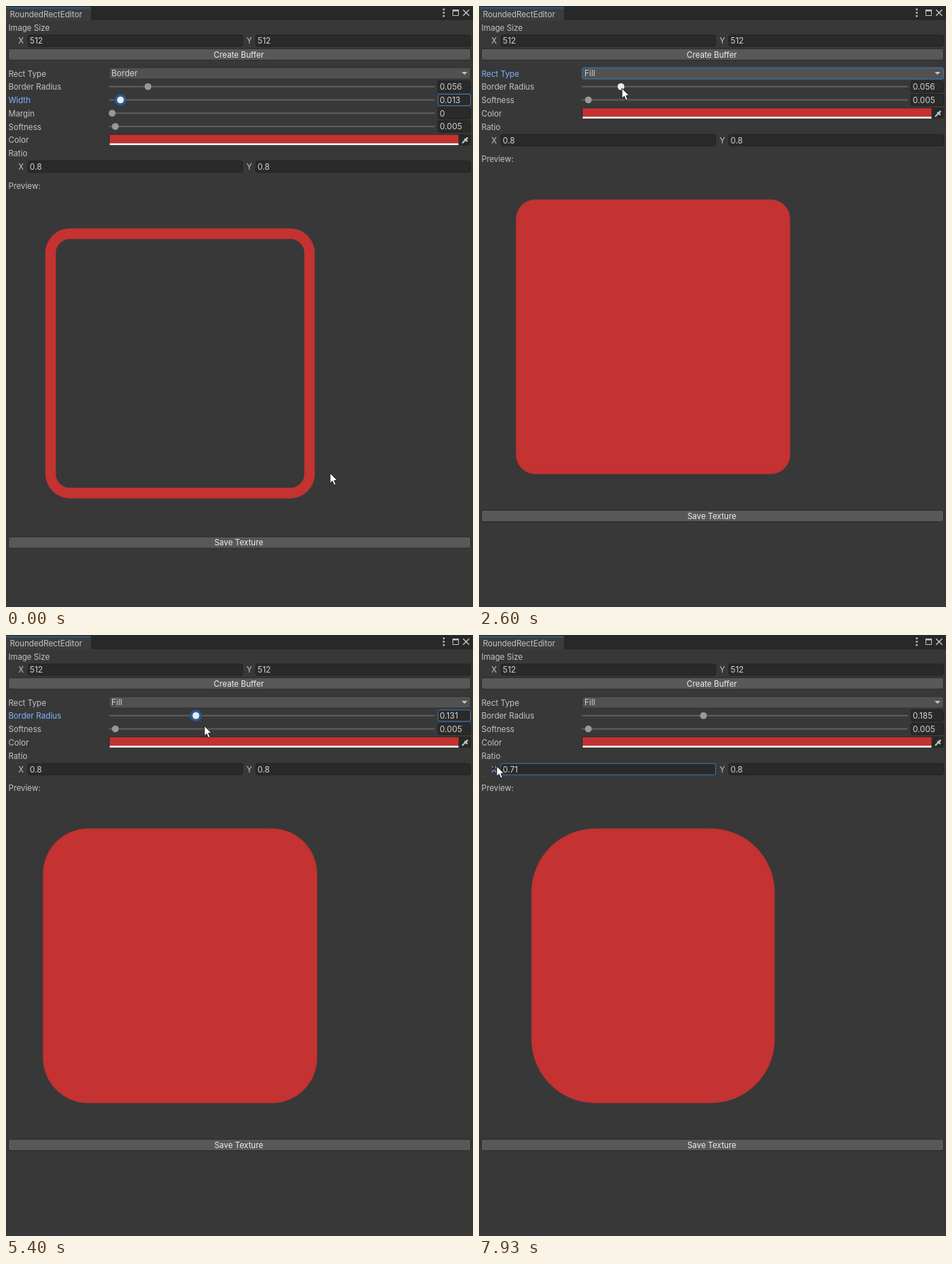
These frames come from a looping animation (660x848 px, 8000 ms). An HTML page:

```html
<!DOCTYPE html>
<html lang="en">
<head>
<meta charset="utf-8">
<title>RoundedRectEditor</title>
<style>
html, body { margin: 0; width: 100%; height: 100%; overflow: hidden; background: #383838; }
svg { display: block; width: 100vw; height: 100vh; }
text { font: 11.25px Inter, sans-serif; fill: #c4c4c4; white-space: pre; }
.num { font-size: 11.6px; fill: #d2d2d2; }
.btn { fill: #eee; text-anchor: middle; }
.on { fill: #81b4ff; }
.menu { font: 11px "Open Sans", sans-serif; letter-spacing: -.3px; fill: #111; }
</style>
</head>
<body>
<svg id="stage" viewBox="0 0 660 848"></svg>
<script>
const LOOP = 8000, ROW = 18.75, RED = '#c43232';
const OPEN = 1390, PICK = 2050, GRAB = 2720, DROP = 5790, SCRUB = 7060;
const stage = document.getElementById('stage');

// Keys are [time, value]; smooth, without overshoot.
function track(keys, t) {
  const last = keys.length - 1;
  if (t <= keys[0][0]) return keys[0][1];
  if (t >= keys[last][0]) return keys[last][1];
  const slope = i => i < 0 || i >= last ? 0 : (keys[i + 1][1] - keys[i][1]) / (keys[i + 1][0] - keys[i][0]);
  const tangent = i => {
    const a = slope(i - 1), b = slope(i);
    return a * b > 0 ? 2 * a * b / (a + b) : 0;
  };
  let i = 0;
  while (t >= keys[i + 1][0]) i++;
  const [t0, a] = keys[i], [t1, b] = keys[i + 1];
  const d = t1 - t0, u = (t - t0) / d, s = u * u * (3 - 2 * u);
  return a + (b - a) * s + d * u * (1 - u) * ((1 - u) * tangent(i) - u * tangent(i + 1));
}

const radiusKeys = [[2800, .056], [3330, .13], [4200, .03], [4530, .088], [5400, .131], [5530, .155], [5600, .155], [5740, .185]];
const scrubKeys = [[7000, 28], [7200, 36], [7400, 41], [7600, 41.5], [7740, 37], [7870, 29], [7930, 25]];
const path = [
  [70, 458, 659], [330, 420, 230], [530, 395, 9], [730, 356, 49], [800, 356, 49],
  [950, 325, 50], [1130, 250, 62], [1330, 212, 95], [1530, 232, 110], [1670, 241, 110],
  [1930, 223, 113], [2000, 223, 113], [2600, 202, 116], [2800, 202, 116],
  [4530, 235, 123], [5400, 269, 128], [5740, 318, 128], [6470, 14, 186],
  [6530, 16, 188], [6600, 16, 188], [6930, 24, 185], [7000, 28, 185], [7930, 28, 185]
];
const pathX = path.map(p => [p[0], p[1]]), pathY = path.map(p => [p[0], p[2]]);

const knobX = v => 150 + 904 * v;
const trim = (v, n) => String(+v.toFixed(n));
const rect = (x, y, w, h, fill, more = '') => `<rect x="${x}" y="${y}" width="${w}" height="${h}" fill="${fill}" ${more}/>`;
const text = (x, y, s, cls = '') => `<text x="${x}" y="${y}" class="${cls}">${s}</text>`;
const label = (c, s, on) => text(3.5, c + 4.6, s, on ? 'on' : '');
const line = (d, color, w) => `<path d="${d}" fill="none" stroke="${color}" stroke-width="${w}"/>`;

function box(x, c, w, fill, edge) {
  return rect(x + .5, c - 8, w - 1, 16, fill, `rx="2.5" stroke="${edge}"`);
}

function field(x, c, w, value, on, hover) {
  return box(x, c, w, '#2a2a2a', on ? '#3a79bb' : hover ? '#656565' : '#212121') + text(x + 3, c + 4.3, value, 'num');
}

function button(c, s) {
  return box(3, c, 654, '#585858', '#2a2a2a') + text(329, c + 4.2, s, 'btn');
}

function pair(c, x, y, on, hover) {
  return text(17.5, c + 4.3, 'X', on ? 'on' : '') + field(30.5, c, 304.5, x, on, hover === 1) +
    text(340, c + 4.3, 'Y') + field(352.5, c, 304.5, y, false, hover === 2);
}

function slider(c, name, v, on, held, hover) {
  const x = knobX(v);
  return label(c, name, on) + rect(145.5, c - 1, 460.5, 2, '#5e5e5e') +
    (held ? `<circle cx="${x}" cy="${c}" r="8.2" fill="#285a97"/>` : '') +
    `<circle cx="${x}" cy="${c}" r="4.8" fill="${held || hover ? '#eaeaea' : '#999'}"/>` +
    field(610, c, 47, trim(v, 3), on);
}

function header() {
  return rect(0, 0, 660, 20, '#282828') + rect(0, 1.5, 120, 19, '#3c3c3c') + rect(0, 1.5, 120, 2, '#2c5d87') +
    text(5.5, 16, 'RoundedRectEditor') +
    [4.8, 9.5, 14.2].map(y => rect(617.5, y - 1.2, 2.4, 2.4, '#c4c4c4')).join('') +
    line('M631.5 6V13.5H639.5V6', '#c4c4c4', 1) + rect(631, 5, 9, 2.5, '#c4c4c4') +
    line('M646 5.2l8.6 8.6m0-8.6l-8.6 8.6', '#c4c4c4', 1.4);
}

function typeRow(c, value, on) {
  return label(c, 'Rect Type', on) + box(145.5, c, 511.5, '#515151', on ? '#3a79bb' : '#303030') +
    text(149, c + 4, value, 'num') + `<path d="M644 ${c - 2}h8l-4 4z" fill="#c4c4c4"/>`;
}

function colorRow(c) {
  return label(c, 'Color') + rect(145.5, c - 8, 511.5, 16, '#282828', 'rx="2"') +
    rect(146.5, c - 7, 493, 12, RED) + rect(146.5, c + 5, 493, 2.5, '#fff') +
    `<g transform="translate(644 ${c + 5.5})">` + line('M.7 -.7l5-5', '#c4c4c4', 2) +
    line('M4 -7l4 4M6 -6l2.6 -2.6', '#c4c4c4', 2.4) + '</g>';
}

function preview(fill, radius, ratio) {
  const cy = fill ? 466.75 : 504.25, r = 488 * radius;
  const hw = fill ? 242 * ratio : 183, hh = fill ? 193.6 : 183;
  const style = fill ? `stroke="${RED}" stroke-opacity=".35"` : `stroke="${RED}" stroke-width="14.8"`;
  return `<clipPath id="view">${rect(6, cy - 240, 480.5, 480, '#fff')}</clipPath><g clip-path="url(#view)">` +
    rect(246 - hw, cy - hh, hw * 2, hh * 2, fill ? RED : 'none', `rx="${r}" ${style}`) + '</g>';
}

function menu(y) {
  return rect(146, 104, 124, 46.5, '#fafafa', 'rx="4" stroke="#d0d0d0" stroke-width=".6"') +
    rect(150, y < 127 ? 107 : 127, 116, 20, '#f0efed', 'rx="2"') +
    text(181, 120.2, 'Fill', 'menu') + text(181, 141.2, 'Border', 'menu') +
    line('M157.5 137.5l2.7 2.7l5.3-5.5', '#222', 1.1);
}

function cursor(x, y, kind) {
  const at = s => `<g transform="translate(${x} ${y})">${s}</g>`;
  if (kind === 'beam') return at(line('M-3.5 -8.5h2.5l1 1l1-1h2.5M0 -7.5v15M-3.5 8.5h2.5l1-1l1 1h2.5', '#ddd', 1));
  const sides = kind === 'slide' ? '<path d="M-6 3l3-2.5v5zM9.5 3l-3-2.5v5z" fill="#111"/>' : '';
  return at(sides + '<path d="M0 0V14.4L3.3 11.3L5.7 17L8.2 15.9L5.8 10.4H10.3Z" fill="#fff" stroke="#111" stroke-width=".9"/>');
}

function draw(t) {
  const fill = t >= PICK, held = t >= GRAB && t < DROP, scrub = t >= SCRUB;
  const radius = track(radiusKeys, t);
  const ratio = scrub ? .8 + .03 * (Math.round(track(scrubKeys, t)) - 28) : .8;
  let x = track(pathX, t);
  const y = track(pathY, t);
  if (t >= 2800 && t < 5740) x = knobX(track(radiusKeys, t + 60)) + 1;
  if (scrub) x = track(scrubKeys, t);

  const inRow = t < OPEN && Math.abs(y - 49) < 8.5;
  const hover = !inRow ? 0 : x > 31 && x < 335 ? 1 : x > 353 ? 2 : 0;
  const kind = hover ? 'beam' : t > 6440 ? 'slide' : 'arrow';
  const shift = fill ? -2 * ROW : 0;
  const row = n => 95 + n * ROW + (n > 1 ? shift : 0);
  const near = t > PICK && Math.hypot(x - knobX(radius), y - 113.75) < 9;

  stage.innerHTML = rect(0, 0, 660, 848, '#383838') + header() +
    label(30.5, 'Image Size') + pair(49, '512', '512', false, hover) + button(68.3, 'Create Buffer') +
    typeRow(row(0), fill ? 'Fill' : 'Border', fill && t < GRAB) +
    slider(row(1), 'Border Radius', radius, t >= GRAB && !scrub, held, near) +
    (fill ? '' : slider(row(2), 'Width', .013, true, true) + slider(row(3), 'Margin', 0)) +
    slider(row(4), 'Softness', .005) + colorRow(row(5)) +
    label(row(6), 'Ratio') + pair(row(7) + .5, trim(ratio, 2), '0.8', scrub) +
    label(253 + shift, 'Preview:') + preview(fill, radius, ratio) +
    button(757 + shift, 'Save Texture') +
    (t >= OPEN && t < PICK ? menu(y) : '') + cursor(x, y, kind);
}

const start = performance.now();
let shown = -1;
function tick() {
  const step = Math.floor(((performance.now() - start) % LOOP) * .015 + .06);
  if (step !== shown) draw(((shown = step) / .015) % LOOP);
  requestAnimationFrame(tick);
}
tick();
</script>
</body>
</html>
```
